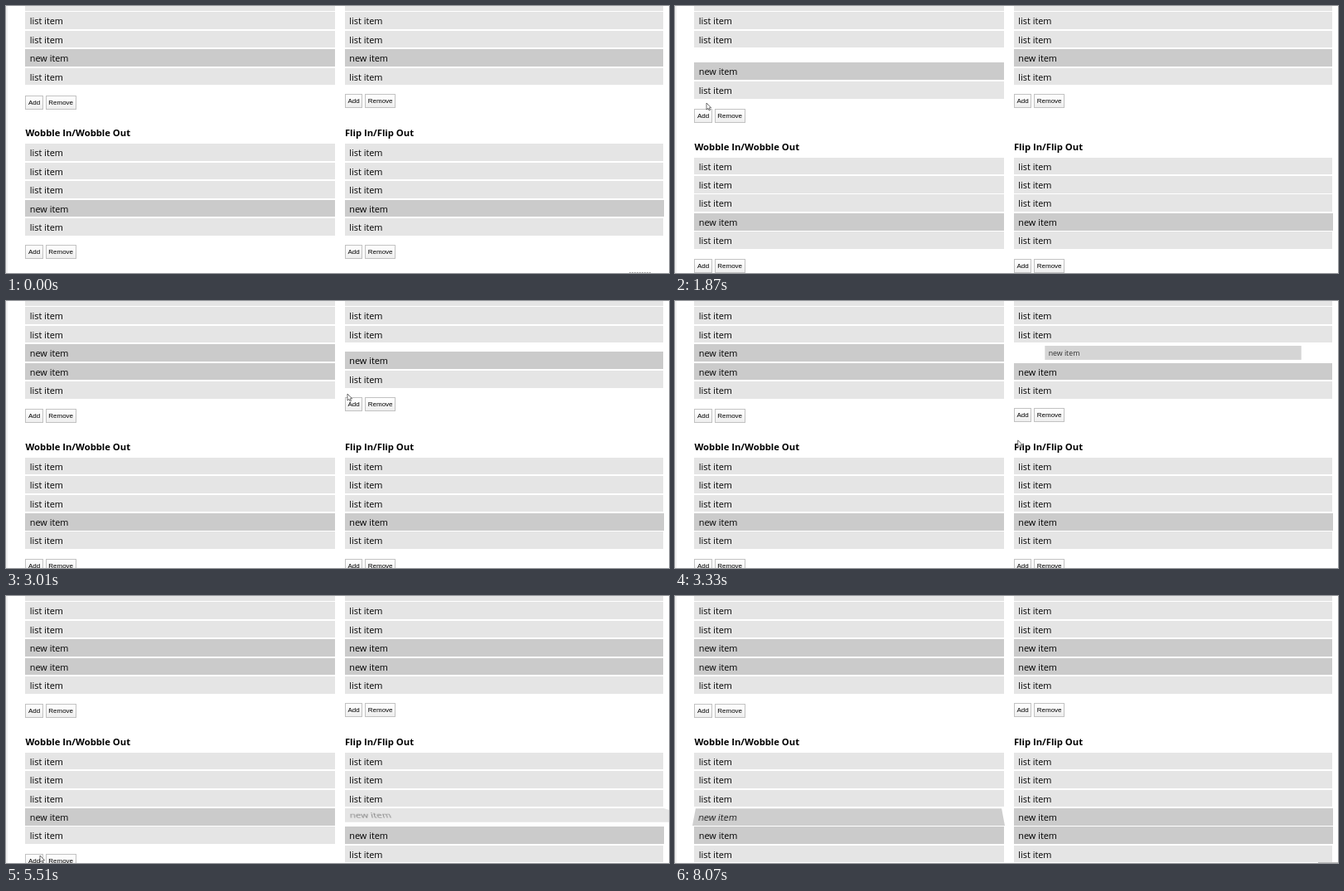
An HTML page that plays this animation: 800x322 px, repeating every 8.16 s.

```html
<!DOCTYPE html>
<html lang="en">
<head>
<meta charset="utf-8">
<title>List animations</title>
<style>
  html, body { margin: 0; width: 100%; height: 100%; overflow: hidden; background: #fff; }
  #stage { position: relative; width: 800px; height: 322px; overflow: hidden; color: #000;
    font: 10.9px/21.4px "Open Sans", "Noto Sans", sans-serif; }
  #stage div { position: absolute; white-space: pre; }
  .edge { left: 0; top: 0; width: 2px; height: 322px; background: #f0f0f0; }
  .list, .tail { left: 0; width: 100%; }
  .row { left: 0; width: 100%; height: 20.7px; background: #e5e5e5; text-indent: 5.4px; }
  .new { background: #cbcbcb; }
  .flip .new { width: calc(100% + 1px); }
  .slot { left: 0; width: 100%; height: 20.7px; }
  .slide .slot { overflow: hidden; }
  .flip .slot .new { transform-origin: 0 0; }
  .title { left: 0; top: -23.1px; line-height: 20px; font-weight: 700; font-size: 11.25px; }
  .button { box-sizing: border-box; height: 17px; border: 1px solid #c2c2c2;
    background: linear-gradient(#fff, #eee); text-align: center;
    font: 8px/15px "Liberation Sans", Arial, sans-serif; }
  .add { left: 0; width: 21.5px; }
  .remove { left: 24.3px; width: 37px; }
  #hint { top: 321px; height: 1px; }
  #cursor { position: absolute; left: 0; top: 0; overflow: visible; }
</style>
</head>
<body>
<div id="stage">
  <div class="edge"></div>
  <div id="hint"></div>
</div>
<script>
const LOOP = 8160, STEP = 77.7, START = 142, PITCH = 22.4;
const OPEN_TIME = 450, TRAVEL_TIME = 450;
const stage = document.getElementById('stage');
const hint = document.getElementById('hint');

function add(parent, className, text = '', top = 0) {
  const el = document.createElement('div');
  el.className = className;
  el.textContent = text;
  if (!className.includes('title')) el.style.top = top + 'px';
  parent.append(el);
  return el;
}

function makeList({ kind, x, y, width, buttonTop, title, opensAt }) {
  const list = add(stage, 'list ' + kind, '', y);
  list.style.left = x + 'px';
  list.style.width = width + 'px';
  if (title) add(list, 'title', title);
  for (let i = 0; i < 3; i++) add(list, 'row', 'list item', i * PITCH);
  const item = add(add(list, 'slot', '', 3 * PITCH), 'row new', 'new item');
  const tail = add(list, 'tail');
  add(tail, 'row new', 'new item');
  add(tail, 'row', 'list item', PITCH);
  add(tail, 'button add', 'Add', buttonTop - 3 * PITCH);
  add(tail, 'button remove', 'Remove', buttonTop - 3 * PITCH);
  return { list, item, tail, y, opensAt };
}

const left = { x: 23.4, width: 373.4 }, right = { x: 408.9, width: 384.3 };
const slide = makeList({ kind: 'slide', ...left, y: -15, buttonTop: 122.8, opensAt: 1556 });
const zoom = makeList({ kind: 'zoom', ...right, y: -15, buttonTop: 121.3, opensAt: 2740 });
const wobble = makeList({ kind: 'wobble', ...left, y: 166.4, buttonTop: 121.9,
  title: 'Wobble In/Wobble Out', opensAt: 5880 });
const flip = makeList({ kind: 'flip', ...right, y: 166.4, buttonTop: 121.9,
  title: 'Flip In/Flip Out', opensAt: 4260 });

stage.insertAdjacentHTML('beforeend',
  `<svg id="cursor" width="7" height="10"><path d="M0 0V8L1.9 6.3 3.2 9 4.5 8.4 3.2 5.8H5.6Z"
   fill="#fff" stroke="#333" stroke-width=".7"/></svg>`);
const cursor = document.getElementById('cursor');

const entry = { x: 808, y: 395 };
const stops = [
  { x: 251, y: 81, at: 450 },
  { x: 38, y: 117, at: 1083 },
  { x: 368, y: 136, at: 2318 },
  { x: 412, y: 112, at: 2768 },
  { x: 418, y: 312, at: 3652 },
  { x: 41, y: 313, at: 5100 },
  { x: 272, y: 188, at: 6824 },
  { x: 772, y: 310, at: 7350 },
];

const progress = (t, from, to) => Math.min(1, Math.max(0, (t - from) / (to - from)));
const ease = p => p * p * (3 - 2 * p);
const opening = (t, { opensAt }) => ease(progress(t, opensAt, opensAt + OPEN_TIME));

function pointerAt(t) {
  let { x, y } = entry;
  for (const stop of stops) {
    const p = progress(t, stop.at - TRAVEL_TIME, stop.at);
    x += (stop.x - x) * p;
    y += (stop.y - y) * p;
  }
  return { x, y };
}

function show({ item }, transform, opacity) {
  item.style.transform = transform;
  item.style.opacity = opacity;
}

function draw(time) {
  const t = START + Math.floor((time % LOOP - START) / STEP) * STEP;

  for (const part of [slide, zoom, wobble, flip])
    part.tail.style.top = (3 + opening(t, part)) * PITCH + 'px';
  const push = Math.max(opening(t, slide), opening(t, zoom)) * PITCH;
  for (const lower of [wobble, flip]) lower.list.style.top = lower.y + push + 'px';

  const slideIn = progress(t, 2060, 2520);
  show(slide, `translateX(${-100 * (1 - slideIn) ** 2}%)`, slideIn);

  const zoomIn = progress(t, 3090, 3385);
  show(zoom, zoomIn < 1 ? `scale(${zoomIn})` : 'none', zoomIn);

  const angle = 90 * (1 - progress(t, 4900, 7300)) ** 2.4;
  show(flip, angle ? `perspective(130px) rotateX(${angle}deg)` : 'none', progress(t, 4900, 6106));

  const since = t - 6824;
  const tilt = 14 * Math.exp(-Math.max(since, -300) / 1380) * Math.cos(2 * Math.PI * since / 622);
  show(wobble, `perspective(100px) rotateX(${tilt}deg)`, progress(t, 6600, 8227) ** 0.7);

  const { x, y } = pointerAt(t);
  cursor.style.transform = `translate(${x}px, ${y}px)`;
  cursor.style.visibility = t >= START && t < 7375 ? 'visible' : 'hidden';

  const late = t > 8050;
  hint.style.display = late || t < 1200 ? 'block' : 'none';
  hint.style.left = (late ? 776 : 752) + 'px';
  hint.style.width = (late ? 24 : 26) + 'px';
  hint.style.background = late ? '#bbb' : 'repeating-linear-gradient(90deg, #aaa 0 2px, #eee 2px 3px)';
}

const begin = performance.now();
function tick() {
  draw(performance.now() - begin);
  requestAnimationFrame(tick);
}
tick();
</script>
</body>
</html>
```
